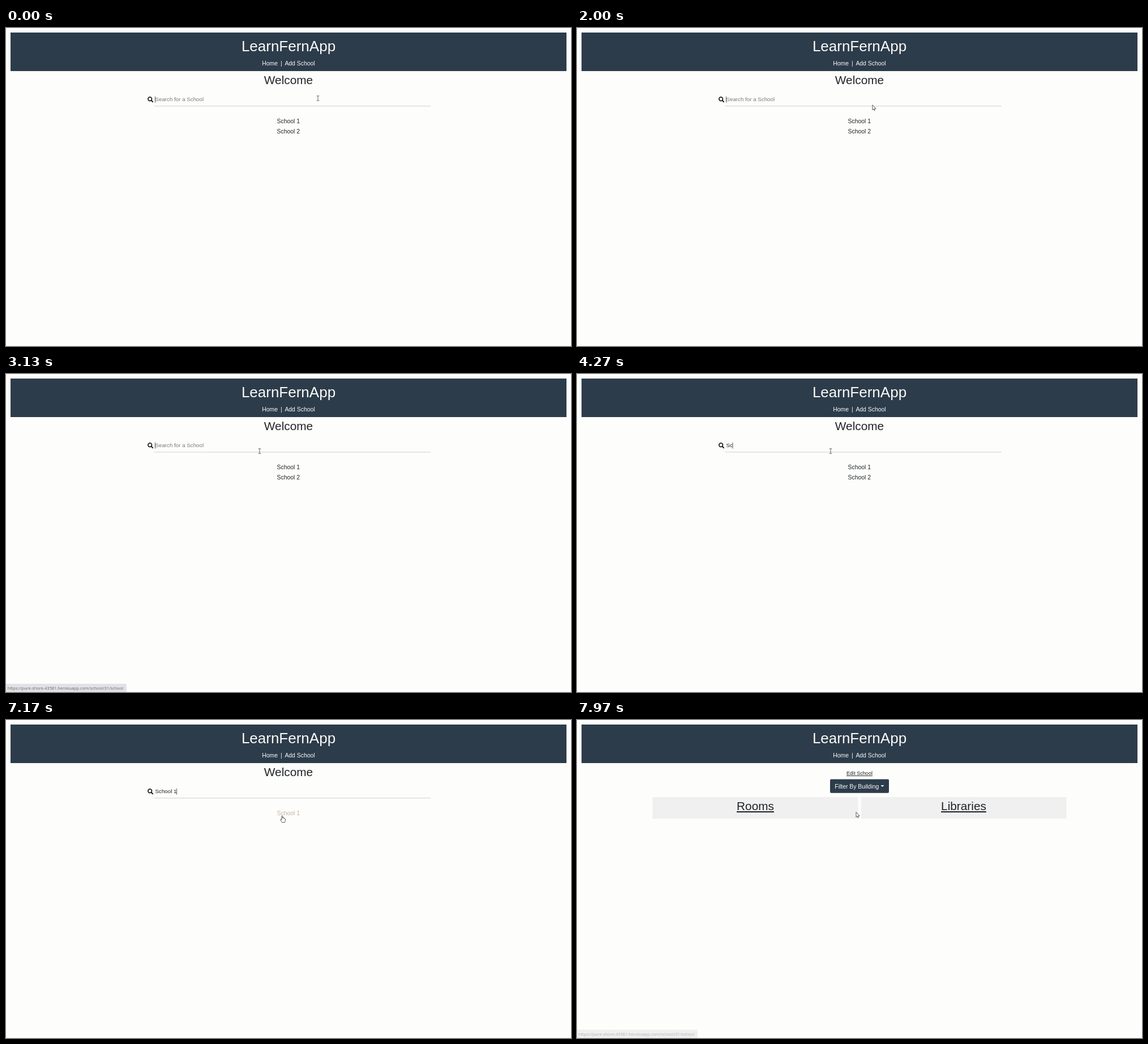
Recreate the animation shown at these times as an HTML page. Size 998 px wide and 561 px high, loop 8 s.

```html
<!DOCTYPE html>
<html lang="en">
<head>
<meta charset="utf-8">
<title>School search</title>
<style>
html, body { margin: 0; width: 100%; height: 100%; overflow: hidden; background: #fdfdfb; }
svg { display: block; width: 998px; height: 561px; }
text { font: 10.4px "Liberation Sans", Arial, sans-serif; fill: #212529; white-space: pre; }
.mid { text-anchor: middle; }
.light { fill: #fafaf6; }
.link { text-decoration: underline; }
.title { font-size: 26px; }
.head { font-size: 20.8px; }
.field { font-size: 9.75px; }
.small { font-size: 9.1px; }
.url { font: 7.4px "Open Sans", "Noto Sans", sans-serif; fill: #66676b; }
.dark { fill: #2d3c4b; }
</style>
</head>
<body>
<svg viewBox="0 0 998 561">
  <rect class="dark" x="8" y="8" width="982" height="68"/>
  <text class="mid light title" x="499" y="41">LearnFernApp</text>
  <text class="light" x="452.2" y="65.6">Home</text>
  <text class="light" x="484.9" y="65.6">|</text>
  <text class="light" x="492.4" y="65.6">Add School</text>

  <g id="search">
    <text class="mid head" x="499" y="99.2">Welcome</text>
    <g fill="none" stroke="#1d2023" stroke-width="1.7">
      <circle cx="254.2" cy="125.2" r="3.3"/>
      <path d="M256.6 127.6l2.5 2.6" stroke-width="2" stroke-linecap="round"/>
    </g>
    <rect x="261.5" y="137.3" width="488.5" height="1" fill="#d0d1d6"/>
    <text id="hint" class="field" x="263.5" y="129.4" style="fill:#777a7e">Search for a School</text>
    <text id="typed" class="field" x="263.5" y="129.4"></text>
    <rect id="caret" y="120.8" width="0.8" height="10.8" fill="#333"/>
    <text id="first" class="mid" x="498.8" y="167.8">School 1</text>
    <text id="second" class="mid" x="498.8" y="186">School 2</text>
  </g>

  <g id="school">
    <text class="mid small link" x="499" y="97">Edit School</text>
    <rect class="dark" x="447" y="104.5" width="104" height="24.3" rx="2"/>
    <text class="light" x="455.3" y="120.6">Filter By Building</text>
    <path class="light" d="M536.4 115h6.2l-3.1 3.1z"/>
    <path d="M133.5 136H496.5V174H133.5zM502 136H864.5V174H502z" fill="#f0f0f0"/>
    <text class="mid head link" x="315" y="159">Rooms</text>
    <text class="mid head link" x="683" y="159">Libraries</text>
  </g>

  <g id="status">
    <path d="M0 546.5H211q2 0 2 2V561H0z" fill="#e1e2e5"/>
    <text class="url" x="2.6" y="556.8">https://pure-shore-43581.herokuapp.com/school/31/school</text>
  </g>

  <g id="pointer" stroke-linejoin="round" stroke-linecap="round">
    <path id="beam" d="M-2-4.2h1.4L0-3.8.6-4.2H2M0-3.8V3.8M-2 4.2h1.4L0 3.8.6 4.2H2" fill="none" stroke="#444" stroke-width=".8"/>
    <path id="arrow" d="M0 0V8.4L1.9 6.7 3.2 9.6 4.5 9 3.2 6.2H5.8z" fill="#fff" stroke="#333" stroke-width=".8"/>
    <path id="hand" d="M-.9 7V.6Q0-.7.9.6V4.2Q2-.2 2.8 4.6 3.8 3.6 4.4 5.1 5.6 4.4 5.6 6V8.6Q5.4 10 4.5 11.8H-.2Q-1.2 9.7-3 7.3-3.1 5.8-1.8 6.2z" fill="#fff" stroke="#333" stroke-width=".8"/>
  </g>
</svg>
<script>
const LOOP = 8000, BLINK = 530, PAGE_CHANGE = 7700;
const QUERY = "School 1";
const KEY_TIMES = [3900, 4270, 4500, 4700, 4900, 5060, 5250, 5600];
const HOVERS = [[2200, 2680], [6500, PAGE_CHANGE]];
// time, x, y of the pointer
const PATH = [
  [1300, 551, 124], [1700, 541, 127], [2000, 522, 136], [2100, 516, 147],
  [2300, 505, 162], [2550, 497, 164], [2800, 468, 149], [2930, 448, 136],
  [6200, 448, 136], [6600, 485, 166], [7170, 487.7, 169], [7600, 489, 168],
  [7800, 493, 163]
];

const el = id => document.getElementById(id);
const show = (id, on) => { el(id).style.display = on ? "" : "none"; };
const clamp = v => Math.max(0, Math.min(1, v));
const within = (t, [a, b]) => t >= a && t < b;
const fade = (t, a, b, c, d) => Math.min(clamp((t - a) / (b - a)), clamp((d - t) / (d - c)));

function pointerAt(t) {
  const i = PATH.findIndex(p => p[0] > t);
  if (i === 0) return PATH[0].slice(1);
  if (i < 0) return PATH[PATH.length - 1].slice(1);
  const [a, b] = [PATH[i - 1], PATH[i]];
  const k = (t - a[0]) / (b[0] - a[0]);
  return [a[1] + (b[1] - a[1]) * k, a[2] + (b[2] - a[2]) * k];
}

function draw(t) {
  const count = KEY_TIMES.filter(k => k <= t).length;
  const hover = HOVERS.some(h => within(t, h));
  const onSchool = t >= PAGE_CHANGE;
  show("search", !onSchool);
  show("school", onSchool);

  show("hint", !count);
  el("typed").textContent = QUERY.slice(0, count);
  show("second", count < QUERY.length);
  el("first").style.fill = hover ? "#c0b59c" : "";

  if (!onSchool) {
    const width = count ? el("typed").getComputedTextLength() : 0;
    el("caret").setAttribute("x", 263.2 + width);
  }
  const blinkStart = count ? KEY_TIMES[count - 1] : -190;
  show("caret", (t - blinkStart) % (2 * BLINK) < BLINK);

  el("status").style.opacity = Math.max(
    fade(t, 2400, 2520, 3300, 3500), fade(t, 7300, 7420, 7850, 8090));

  const [x, y] = pointerAt(t);
  el("pointer").setAttribute("transform", `translate(${x} ${y})`);
  const beam = t < 1980 || within(t, [2880, 6270]);
  show("beam", beam);
  show("hand", hover);
  show("arrow", !beam && !hover);
}

function tick(now) {
  draw(now % LOOP);
  requestAnimationFrame(tick);
}
draw(0);
requestAnimationFrame(tick);
</script>
</body>
</html>
```
